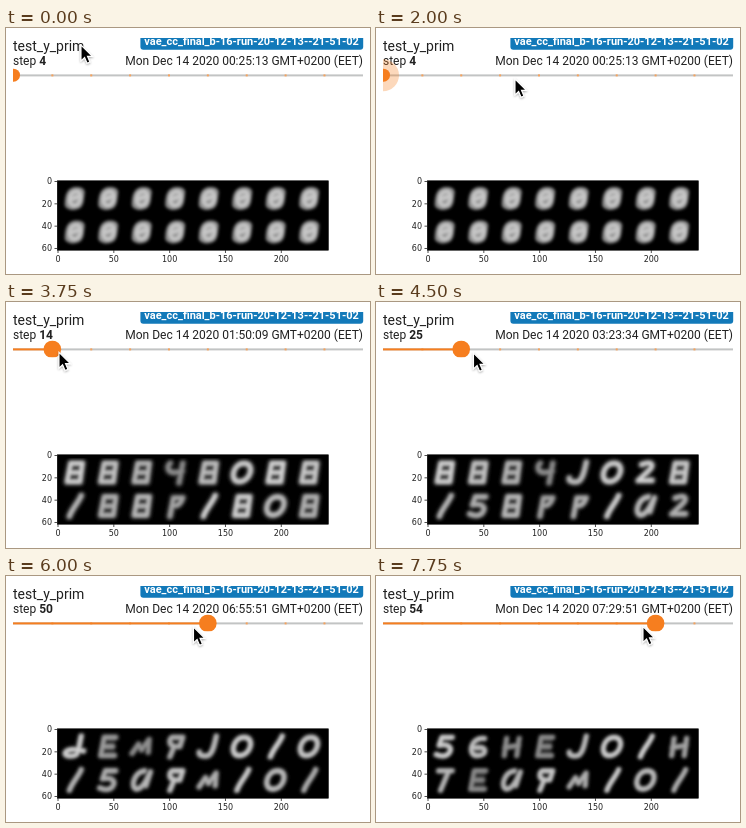
An HTML page for the animation above (8000 ms loop, 364 px wide and 246 px high).

```html
<!DOCTYPE html>
<html lang="en">
<head>
<meta charset="utf-8">
<title>Image slider</title>
<style>
html, body { margin: 0; width: 100%; height: 100%; overflow: hidden; background: #fff; }
svg { display: block; width: 364px; height: 246px; }
.ui { font-family: Roboto, sans-serif; font-size: 12px; fill: #212121; }
.axis { font-family: "DejaVu Sans", sans-serif; font-size: 8px; fill: #222; }
.glyph path { fill: none; stroke-linejoin: round; stroke-linecap: round; }
</style>
</head>
<body>
<svg viewBox="0 0 364 246">
  <defs>
    <clipPath id="panel"><rect x="7" y="10" width="351" height="236"/></clipPath>
    <clipPath id="lane"><rect x="7" y="38.6" width="351" height="16.7"/></clipPath>
    <filter id="soft" x="-5%" y="-10%" width="110%" height="120%"><feGaussianBlur stdDeviation="1.4"/></filter>
    <filter id="shade" x="-50%" y="-50%" width="200%" height="200%">
      <feDropShadow dx="0" dy="1" stdDeviation="0.8" flood-opacity="0.35"/>
    </filter>
  </defs>
  <rect width="364" height="246" fill="#fff"/>
  <g class="ui">
    <g clip-path="url(#panel)">
      <rect x="134.4" y="4" width="222.8" height="17.7" rx="3" fill="#1279b9"/>
      <text x="138.3" y="17" font-size="11" font-weight="700" fill="#fff">vae_cc_final_b-16-run-20-12-13--21-51-02</text>
    </g>
    <text x="7" y="23" font-size="14">test_y_prim</text>
    <text x="7" y="37">step <tspan id="step" font-weight="700"></tspan></text>
    <text id="date" x="357" y="37" text-anchor="end"></text>
  </g>
  <g clip-path="url(#panel)">
    <rect x="7" y="46.4" width="350" height="2" fill="#c2c4c4"/>
    <g id="marks" fill="#f6a25c"></g>
    <rect id="bar" x="7" y="46.4" height="2" fill="#f67e1f"/>
    <circle id="halo" cx="7" cy="47.2" r="16" fill="#f67e1f" opacity="0.3"/>
  </g>
  <g clip-path="url(#lane)"><circle id="knob" cy="47.2" fill="#f67e1f"/></g>
  <rect x="51.3" y="152.8" width="271" height="69.4" stroke="#000" stroke-width="0.6"/>
  <g id="grid" class="glyph" filter="url(#soft)"></g>
  <g id="axes" class="axis"></g>
  <path id="cursor" d="M0 0V15.8L3.6 12.5L6.1 18.2L8.9 17L6.5 11.4H11.4Z" fill="#000" stroke="#fff" stroke-width="1.1" filter="url(#shade)"/>
</svg>
<script>
const LOOP = 8000, TICK = 250, X0 = 7.5, GAP = 38.87, SCALE = 1.1165;
const $ = id => document.getElementById(id);

const strokes = {
  o: "M1-8C-9-8-11 8-2 8C8 8 11-8 1-8Z",
  a: "M2-8C-7-7-10 6-4 8C2 8 5-2 7-7L4 5",
  d: "M5-9C4-4 4 4 2 7C-1 9-7 9-8 6C-7 2 1 2 8 4",
  J: "M6-9C5-2 4 6 0 8C-4 9-8 8-8 5",
  8: "M-4-8H6L5 8H-6L-4-8M-5 0H5",
  E: "M6-8H-4L-6 8H6M-5 0H4",
  "/": "M5-9C3-3-2 2-4 9",
  T: "M-6-8H6M3-8L-3 9",
  S: "M6-8H-3L-5-1C4-3 7 2 4 6C2 9-3 9-7 7",
  r: "M-4 9L-2-7H6M-2 0C3 0 5-3 6-7",
  P: "M-4 9L-1 0C-7-2-5-8-3-8H6L4 0H-1",
  H: "M-6 8L-5-7M6-7L5 8M-6 1L6-1",
  9: "M4 9L6-8M6-1C-8 3-8-6-5-8",
  2: "M-4-7C4-10 8-7 2-1L-6 7H6",
  G: "M5-7C-8-9-9 9 0 8C8 8 8 0 0 1H-4",
  m: "M-8 6L-3-2L0 3L6-6V5"
};
const filled = "8EGH", faint = "mErH9";

// step, time, sixteen glyphs (two rows of eight)
const states = [
  [4, "00:25:13", "*".repeat(16)],
  [14, "01:50:09", "88898o88/88r/8o8"],
  [25, "03:23:34", "8889Jo28/S8rr/a2"],
  [32, "04:23:02", "8E89Jo28/Sar//o/"],
  [38, "05:14:01", "8EEEJo/8TSar//o/"],
  [50, "06:55:51", "dEmPJo/o/SaPm/o/"],
  [52, "07:12:51", "dGmEJo/H/SaPm/o/"],
  [54, "07:29:51", "SGHEJo/HTEaPm/o/"]
];

// time, x, y of the pointer tip
const track = [
  [0, 75, 17], [1250, 15.5, 48.5], [2000, 139, 51], [2500, 15, 51], [2750, 9, 49.5],
  [3000, 8.5, 49.5], [4500, 97.5, 51], [5250, 143.9, 51], [6000, 187.5, 51],
  [6750, 262, 50.5], [7000, 262, 50.5], [7750, 267, 50.5], [8000, 267, 50.5]
];

function pointer(t) {
  const i = track.findIndex((p, n) => n && t <= p[0]);
  const a = track[i - 1], b = track[i], f = (t - a[0]) / (b[0] - a[0]);
  return [a[1] + (b[1] - a[1]) * f, a[2] + (b[2] - a[2]) * f];
}

const blob = `<path d="M-2-11C4-12 10-11 10-6C9 2 9 6 6 9C1 13-8 12-10 7C-10-3-8-9-2-11Z" style="fill:#8e8e8e"/>
  <path d="M2-7C-7-8-7 8-1 7C7 8 8-8 2-7ZM-4 1L4-2" style="fill:#a4a4a4" stroke="#c8c8c8" stroke-width="3.4"/>
  <ellipse cx="0" cy="3.5" rx="1.7" ry="1.3" fill="#888"/>`;

function glyph(ch, i, k) {
  const x = 51.5 + (16 + 30 * (i % 8)) * SCALE - 0.6;
  const y = 153 + (16 + 30 * (i >> 3)) * SCALE - 0.4;
  const place = `transform="translate(${x} ${y})`;
  if (ch === "*") return `<g ${place}">${blob}</g>`;
  const light = (faint.includes(ch) ? 0.7 : 0.86) + 0.08 * Math.sin(i * 5.3 + 1);
  const d = strokes[ch], fill = filled.includes(ch) ? "#555" : "none";
  return `<g ${place} scale(1.14) skewX(-4)" opacity="${light}">
    <path d="${d}" style="fill:${fill}" stroke="#4a4a4a" stroke-width="${8.5 - k * 0.3}"/>
    <path d="${d}" stroke="#e2e2e2" stroke-width="3.2"/></g>`;
}

function buildAxes() {
  let s = "", m = "";
  for (let v = 0; v <= 200; v += 50) {
    const x = 52 + v * SCALE;
    s += `<path d="M${x} 222v3" stroke="#222" stroke-width=".8"/><text x="${x}" y="234" text-anchor="middle">${v}</text>`;
  }
  for (let v = 0; v <= 60; v += 20) {
    const y = 153.5 + v * SCALE;
    s += `<path d="M51.5 ${y}h-3" stroke="#222" stroke-width=".8"/><text x="46" y="${y + 2.8}" text-anchor="end">${v}</text>`;
  }
  for (let k = 1; k < 9; k++) m += `<rect x="${X0 + k * GAP - 1}" y="46.4" width="2" height="2"/>`;
  $("axes").innerHTML = s;
  $("marks").innerHTML = m;
}

let shown = -1;
function showState(k) {
  if (k === shown) return;
  shown = k;
  const [step, time, row] = states[k], x = X0 + k * GAP;
  $("step").textContent = step;
  $("date").textContent = `Mon Dec 14 2020 ${time} GMT+0200 (EET)`;
  $("grid").innerHTML = [...row].map((ch, i) => glyph(ch, i, k)).join("");
  $("knob").setAttribute("cx", x);
  $("knob").setAttribute("r", k ? 8.8 : 6.5);
  $("bar").setAttribute("width", x - 7);
}

function draw(now) {
  const t = Math.floor((now % LOOP) / TICK) * TICK;
  const [x, y] = pointer(t);
  const k = t < 3000 ? 0 : Math.max(0, Math.min(7, Math.round((x - X0) / GAP)));
  showState(k);
  $("halo").style.display = t >= 1250 && !k ? "" : "none";
  $("cursor").setAttribute("transform", `translate(${x} ${y})`);
}

function loop() {
  draw(performance.now());
  requestAnimationFrame(loop);
}

buildAxes();
loop();
</script>
</body>
</html>
```
